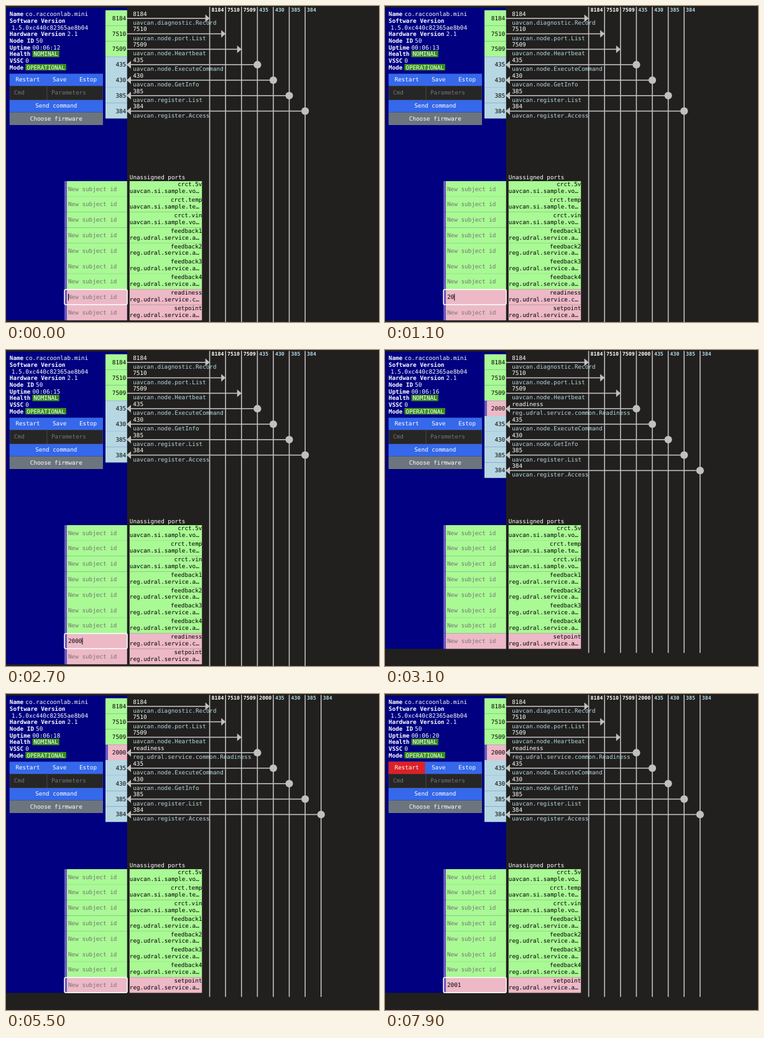
Recreate the animation shown at these times as an HTML page with a canvas. Size 600 by 507 pixels, loop 8 s.

```html
<!DOCTYPE html>
<html lang="en">
<head>
<meta charset="utf-8">
<title>Node monitor</title>
<style>
html, body { margin: 0; width: 100%; height: 100%; overflow: hidden; background: #21201e; }
canvas { display: block; }
</style>
</head>
<body>
<canvas id="stage" width="600" height="507"></canvas>
<script>
const ctx = document.getElementById('stage').getContext('2d');
const LOOP = 8000, FONT = 9.3, CHAR = FONT * 0.602, ROW = 24.8;
const PORTS_TOP = 6.8, LIST_TOP = 281, FOCUS_ROW = 7;
const C = {
  back: '#21201e', panel: '#000080', green: '#a9f994', blue: '#b7d7e2', pink: '#edb9c7',
  strip: '#6a58c0', line: '#c0c0c0', type: '#b4d6e2', hint: '#757575',
  button: '#3568ea', red: '#dc2127', gray: '#6c757d', badge: '#388e1c'
};

const port = (id, type, kind, name = id) => ({ id, type, kind, name });
const PUBLISHED = [
  port('8184', 'uavcan.diagnostic.Record', 'pub'),
  port('7510', 'uavcan.node.port.List', 'pub'),
  port('7509', 'uavcan.node.Heartbeat', 'pub')
];
const READINESS = port('2000', 'reg.udral.service.common.Readiness', 'sub', 'readiness');
const SERVICES = [
  port('435', 'uavcan.node.ExecuteCommand', 'srv'),
  port('430', 'uavcan.node.GetInfo', 'srv'),
  port('385', 'uavcan.register.List', 'srv'),
  port('384', 'uavcan.register.Access', 'srv')
];
const KIND_COLOR = { pub: C.green, sub: C.pink, srv: C.blue };

const UNASSIGNED = [
  ['crct.5v', 'uavcan.si.sample.vo…'],
  ['crct.temp', 'uavcan.si.sample.te…'],
  ['crct.vin', 'uavcan.si.sample.vo…'],
  ...[1, 2, 3, 4].map(n => ['feedback' + n, 'reg.udral.service.a…']),
  ['readiness', 'reg.udral.service.c…'],
  ['setpoint', 'reg.udral.service.a…']
];

// Each timeline is a list of [start time, value].
const TICKS = [[0, 12], [900, 13], [1900, 14], [2500, 15], [3100, 16], [4100, 17], [5100, 18], [6100, 19], [7100, 20]];
const TYPED = [[0, ''], [900, '2'], [1000, '20'], [1200, '200'], [1400, '2000'], [3100, ''],
  [6300, '2'], [6500, '20'], [7000, '200'], [7100, '2001']];
const CARET = [[0, true], [300, false], [900, true], [1900, false], [2400, true], [2900, false],
  [3600, true], [4100, false], [4700, true], [5300, false], [5900, true], [7700, false]];
const FOCUS = [[0, true], [3100, false], [3600, true]];
const at = (timeline, t) => timeline.filter(([start]) => start <= t).pop()[1];

function box(color, x, y, w, h) {
  ctx.fillStyle = color;
  ctx.fillRect(x, y, w, h);
}

function text(str, x, y, color = '#fff', { align = 'left', bold = false, size = FONT } = {}) {
  ctx.font = `${bold ? 'bold ' : ''}${size}px "DejaVu Sans Mono", monospace`;
  ctx.textAlign = align;
  ctx.fillStyle = color;
  ctx.fillText(str, x, y);
}

function arrow(tip, y, dir) {
  ctx.fillStyle = C.line;
  ctx.beginPath();
  ctx.moveTo(tip, y);
  ctx.lineTo(tip - 7 * dir, y - 6.2);
  ctx.lineTo(tip - 7 * dir, y + 6.2);
  ctx.fill();
}

function drawInfo(t) {
  const info = [
    ['Name', 'co.raccoonlab.mini'], ['Software Version'], ['', '1.5.0xc440c82365ae8b04'],
    ['Hardware Version', '2.1'], ['Node ID', '50'], ['Uptime', '00:06:' + at(TICKS, t)],
    ['Health', 'NOMINAL', true], ['VSSC', '0'], ['Mode', 'OPERATIONAL', true]
  ];
  info.forEach(([label, value = '', badge], i) => {
    const y = 16.4 + i * 10.65;
    let x = 5.8 + label.length * CHAR + 3.1;
    text(label, 5.8, y, '#fff', { bold: true });
    if (badge) {
      box(C.badge, x, y - 8.6, value.length * CHAR + 4, 10.4);
      x += 2;
    }
    text(value, x, y);
  });
}

function drawControls(t) {
  const center = { align: 'center' };
  box(C.button, 5.7, 108.6, 150.3, 19.6);
  if (t >= 6500) box(C.red, 5.7, 108.6, 58.6, 19.6);
  text('Restart', 35, 121.2, '#fff', center);
  text('Save', 86.2, 121.2, '#fff', center);
  text('Estop', 132, 121.2, '#fff', center);

  box('#424242', 5.7, 128.2, 150.3, 22.8);
  box('#262626', 6.4, 128.9, 58.8, 21.4);
  box('#262626', 66.4, 128.9, 88.9, 21.4);
  text('Cmd', 13, 142.4, C.hint);
  text('Parameters', 73, 142.4, C.hint);

  box(C.button, 5.7, 151, 150.3, 19.5);
  text('Send command', 80.8, 163.4, '#fff', center);
  box(C.gray, 5.7, 170.5, 150.3, 20.5);
  text('Choose firmware', 80.8, 184, '#fff', center);
}

function drawPorts(ports, bottom) {
  const column = i => 327.6 + i * 25.6;
  ports.forEach((p, i) => {
    const x = column(i);
    box(C.line, x - 0.8, 1.5, 1.6, bottom - 1.5);
    text(p.id, x + 2.9, 9, p.kind === 'srv' ? C.type : '#fff', { bold: true, size: 8.27 });
  });
  ports.forEach((p, i) => {
    const x = column(i), top = PORTS_TOP + i * ROW, y = top + 13;
    box(KIND_COLOR[p.kind], 160, top, 34.8, ROW + 0.1);
    if (p.kind === 'sub') box(C.strip, 160, top, 4, ROW);
    text(p.id, 193.2, top + 16, '#000', { align: 'right' });

    box(C.line, 194.8, y - 0.8, x - 194.8, 1.6);
    if (p.kind === 'pub') {
      arrow(x, y, 1);
    } else {
      arrow(194, y, -1);
      ctx.beginPath();
      ctx.arc(x, y, 6.1, 0, 7);
      ctx.fill();
    }
    text(p.name, 204.2, top + 8.7);
    text(p.type, 204.2, top + 22.9, C.type);
  });
}

function drawUnassigned(rows, t) {
  const typed = at(TYPED, t), focused = at(FOCUS, t);
  text('Unassigned ports', 198.8, 277.6);
  rows.forEach(([name, type], i) => {
    const y = LIST_TOP + i * ROW, color = i < FOCUS_ROW ? C.green : C.pink;
    const value = i === FOCUS_ROW ? typed : '';
    box(color, 98, y, 96.8, ROW + 0.1);
    box(C.strip, 94, y, 4, ROW + 0.1);
    text(value || 'New subject id', 100, y + 15.6, value ? '#000' : C.hint);
    box(color, 198.8, y, 116.4, ROW + 0.1);
    text(name, 315.4, y + 8.3, '#000', { align: 'right' });
    text(type, 198.8, y + 19.2, '#000');
  });
  if (!focused) return;

  const y = LIST_TOP + FOCUS_ROW * ROW;
  ctx.strokeStyle = '#fff';
  ctx.lineWidth = 1.6;
  ctx.beginPath();
  ctx.roundRect(94, y + 0.2, 101, ROW - 0.4, 2.5);
  ctx.stroke();
  if (at(CARET, t)) box('#000', 100 + typed.length * CHAR, y + 7, 1, 11);
}

function draw(now) {
  const t = now % LOOP, assigned = t >= 3100;
  const ports = [...PUBLISHED, ...(assigned ? [READINESS] : []), ...SERVICES];
  const rows = UNASSIGNED.filter(([name]) => !assigned || name !== 'readiness');
  ctx.textRendering = 'geometricPrecision';
  box(C.back, 0, 0, 600, 507);
  box(C.panel, 0.6, 2.6, 194.2, LIST_TOP + rows.length * ROW - 2.6);
  drawInfo(t);
  drawControls(t);
  drawPorts(ports, assigned ? 486 : 507);
  drawUnassigned(rows, t);
}

const start = performance.now();
function frame() {
  draw(performance.now() - start);
  requestAnimationFrame(frame);
}
frame();
</script>
</body>
</html>
```
